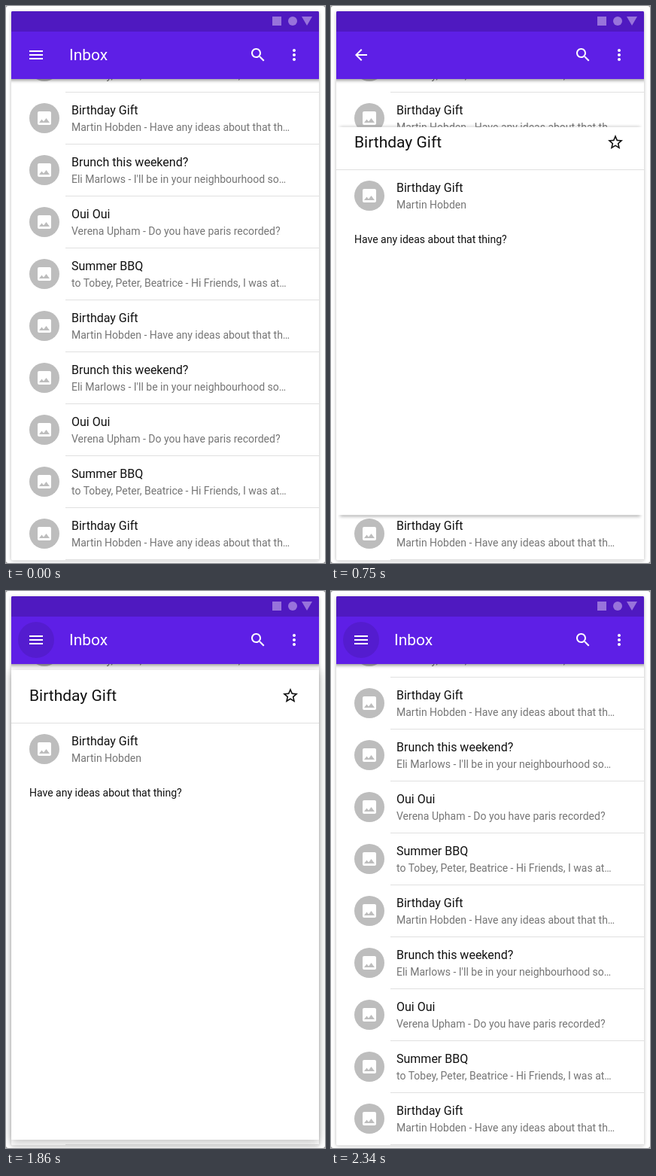
An HTML page that plays this animation: 424x740 px, repeating every 2430 ms.

```html
<!DOCTYPE html>
<html lang="en">
<head>
<meta charset="utf-8">
<title>Inbox</title>
<style>
  html, body { margin: 0; width: 100%; height: 100%; overflow: hidden; background: #8a8a8a; }
  svg { display: block; width: 424px; height: 740px; }
  text { font-family: Roboto, "Open Sans", sans-serif; white-space: pre; }
  .title { font-size: 16px; fill: #111; }
  .sub { font-size: 14px; fill: #757575; }
  .body { font-size: 14px; fill: #111; }
  .big { font-size: 21px; fill: #111; }
  .line { stroke: #e0e0e0; stroke-width: 1; }
</style>
</head>
<body>
<svg viewBox="0 0 424 740">
  <defs>
    <filter id="soft" x="-10%" y="-20%" width="120%" height="140%"><feGaussianBlur stdDeviation="2"/></filter>
    <filter id="wide" filterUnits="userSpaceOnUse" x="-30" y="0" width="484" height="800"><feGaussianBlur stdDeviation="7"/></filter>
    <clipPath id="phone"><rect x="7" y="7" width="409" height="729.5" rx="2"/></clipPath>
    <clipPath id="rowClip"><rect x="7" y="390.5" width="409" height="69"/></clipPath>
    <clipPath id="cardClip"><rect id="cardBox" x="7" width="409"/></clipPath>
    <g id="avatar">
      <circle r="20" fill="#bdbdbd"/>
      <path transform="translate(-12 -12)" fill="#fff" d="M21 19V5c0-1.1-.9-2-2-2H5c-1.1 0-2 .9-2 2v14c0 1.1.9 2 2 2h14c1.1 0 2-.9 2-2zM8.5 13.5l2.5 3.01L14.5 12l4.5 6H5l3.5-4.5z"/>
    </g>
  </defs>

  <rect width="424" height="740" rx="3" fill="#fefefe"/>
  <rect x="7" y="8" width="409" height="729" rx="2" fill="#000" opacity=".28" filter="url(#soft)"/>
  <rect x="7" y="7" width="409" height="729.5" rx="2" fill="#fff"/>
  <g id="list" clip-path="url(#phone)"></g>
  <g clip-path="url(#rowClip)"><circle id="tap" cx="212" cy="425" fill="#000"/></g>

  <g clip-path="url(#phone)"><rect id="openShade" x="12" width="399" filter="url(#soft)"/></g>
  <rect id="closeShade" x="7" width="409" filter="url(#wide)"/>
  <g id="card" clip-path="url(#cardClip)">
    <rect x="7" y="90" width="409" height="650" fill="#fff"/>
    <g id="mail">
      <text class="big" x="31" y="140">Birthday Gift</text>
      <path transform="translate(366 121)" fill="#111" d="M22 9.24l-7.19-.62L12 2 9.19 8.63 2 9.24l5.46 4.73L5.82 21 12 17.27 18.18 21l-1.63-7.03L22 9.24zM12 15.4l-3.76 2.27 1-4.28-3.32-2.88 4.38-.38L12 6.1l1.71 4.04 4.38.38-3.32 2.88 1 4.28L12 15.4z"/>
      <path class="line" d="M7 169.5H416"/>
      <use href="#avatar" x="51" y="204"/>
      <text class="title" x="87" y="199">Birthday Gift</text>
      <text class="sub" x="87" y="221">Martin Hobden<tspan id="tail"> - Have any ideas about that th…</tspan></text>
      <text class="body" x="31" y="267">Have any ideas about that thing?</text>
    </g>
  </g>

  <g clip-path="url(#phone)">
    <rect x="4" y="20" width="415" height="79" fill="#000" opacity=".4" filter="url(#soft)"/>
    <rect x="7" y="7" width="409" height="90" fill="#5e1fe6"/>
    <rect x="7" y="7" width="409" height="27" fill="#4f19c0"/>
  </g>
  <g fill="#9873db">
    <rect x="354" y="14" width="12" height="12"/>
    <circle cx="381" cy="20" r="6"/>
    <path d="M393 14h14l-7 12z"/>
  </g>
  <circle id="press" cx="40" cy="65" fill="#000"/>
  <g fill="#fff">
    <g id="home">
      <path transform="translate(28 53)" d="M3 18h18v-2H3v2zm0-5h18v-2H3v2zm0-7v2h18V6H3z"/>
      <text x="84" y="72" font-size="21">Inbox</text>
    </g>
    <path id="back" transform="translate(28 53)" d="M20 11H7.83l5.59-5.59L12 4l-8 8 8 8 1.41-1.41L7.83 13H20v-2z"/>
    <path transform="translate(323 53)" d="M15.5 14h-.79l-.28-.27C15.41 12.59 16 11.11 16 9.5 16 5.91 13.09 3 9.5 3S3 5.91 3 9.5 5.91 16 9.5 16c1.61 0 3.09-.59 4.23-1.57l.27.28v.79l5 4.99L20.49 19l-4.99-5zm-6 0C7.01 14 5 11.99 5 9.5S7.01 5 9.5 5 14 7.01 14 9.5 11.99 14 9.5 14z"/>
    <path transform="translate(371 53)" d="M12 8c1.1 0 2-.9 2-2s-.9-2-2-2-2 .9-2 2 .9 2 2 2zm0 2c-1.1 0-2 .9-2 2s.9 2 2 2 2-.9 2-2-.9-2-2-2zm0 6c-1.1 0-2 .9-2 2s.9 2 2 2 2-.9 2-2-.9-2-2-2z"/>
  </g>
</svg>
<script>
const LOOP = 2430, STEP = 30;
const OPEN = [482, 1012], CLOSE = [1814, 2266];
const ROW = { top: 390.5, bottom: 459.5 }, FULL = { top: 97, bottom: 736.5 };
const SHIFT = 221;

const mails = [
  ["Birthday Gift", "Martin Hobden - Have any ideas about that th…"],
  ["Brunch this weekend?", "Eli Marlows - I'll be in your neighbourhood so…"],
  ["Oui Oui", "Verena Upham - Do you have paris recorded?"],
  ["Summer BBQ", "to Tobey, Peter, Beatrice - Hi Friends, I was at…"]
];

const el = id => document.getElementById(id);
const set = (id, attrs) => {
  for (const k in attrs) el(id).setAttribute(k, attrs[k]);
};
const show = (id, on) => set(id, { visibility: on ? "visible" : "hidden" });
const mix = (a, b, p) => a + (b - a) * p;
const ramp = (t, a, b) => Math.min(1, Math.max(0, (t - a) / (b - a)));

// cubic-bezier(.4, 0, .2, 1)
function ease(x) {
  let lo = 0, hi = 1, s = x;
  for (let i = 0; i < 24; i++) {
    s = (lo + hi) / 2;
    const v = 1 - s;
    if (1.2 * v * v * s + 0.6 * v * s * s + s * s * s < x) lo = s;
    else hi = s;
  }
  return s * s * (3 - 2 * s);
}

function buildList() {
  let out = "";
  for (let i = -1; i < 9; i++) {
    const y = 114.5 + 69 * i;
    const [title, sub] = mails[(i + 4) % 4];
    out += `<use href="#avatar" x="51" y="${y + 34.5}"/>
      <text class="title" x="87" y="${y + 29.5}">${title}</text>
      <text class="sub" x="87" y="${y + 51.5}">${sub}</text>
      <path class="line" d="M79 ${y + 69}H416"/>`;
  }
  el("list").innerHTML = out;
}

function draw(t) {
  const p = ease(ramp(t, ...OPEN)) - ease(ramp(t, ...CLOSE));
  const top = mix(ROW.top, FULL.top, p);
  const bottom = mix(ROW.bottom, FULL.bottom, p);
  const height = bottom - top;
  const inMail = t >= 480 && t < 1800;

  set("cardBox", { y: top, height });
  set("mail", { transform: `translate(0 ${SHIFT * (1 - p)})` });
  show("card", t >= OPEN[0] && t < CLOSE[1]);
  set("tail", { "fill-opacity": t < 1400 ? 1 - ramp(t, 482, 570) : ramp(t, 2180, 2260) });

  const lift = ramp(t, 420, 540) * (1 - ramp(t, 930, 1012));
  set("openShade", { y: top, height: height + 2, opacity: 0.3 * lift });
  const drop = ramp(t, 1740, 1830) * (1 - ramp(t, 2190, 2340));
  set("closeShade", { y: top + 3, height, opacity: 0.26 * drop });

  set("tap", {
    r: 230 * Math.sqrt(ramp(t, 30, 360)),
    opacity: 0.07 * ramp(t, 0, 90) * (1 - ramp(t, 300, 480))
  });
  set("press", { r: 24 * Math.sqrt(ramp(t, 1730, 1840)), opacity: 0.1 });

  show("home", !inMail);
  show("back", inMail);
}

buildList();
const start = performance.now();
function tick() {
  const t = (performance.now() - start) % LOOP;
  draw(t - t % STEP);
  requestAnimationFrame(tick);
}
tick();
</script>
</body>
</html>
```
